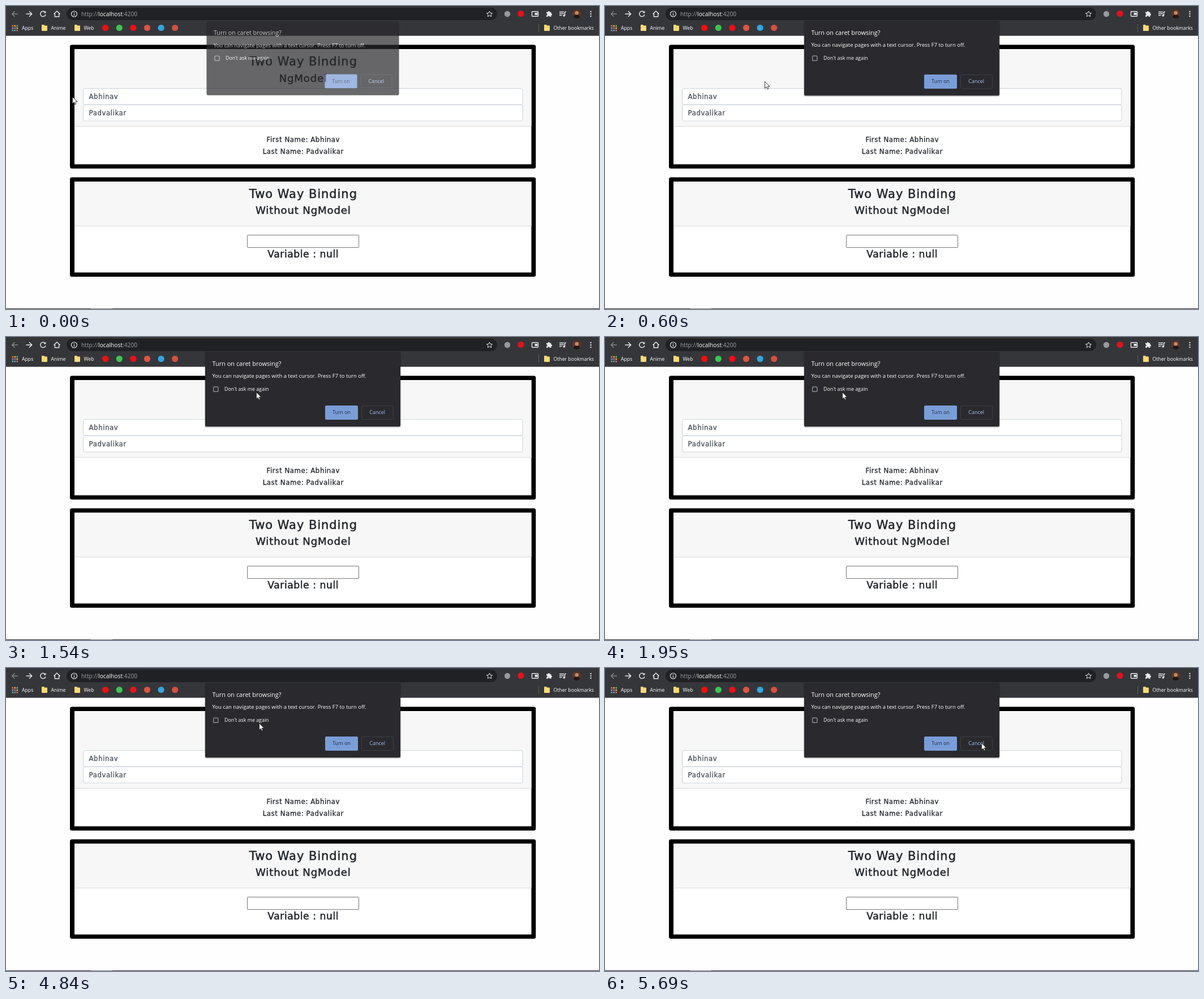
Recreate the animation shown at these times as an HTML page. Size 1048 by 535 pixels, loop 8000 ms.

```html
<!DOCTYPE html>
<html lang="en">
<head>
<meta charset="utf-8">
<title>Two Way Binding</title>
<style>
  html, body { margin: 0; width: 100%; height: 100%; overflow: hidden; background: #fefefe; }
  svg { display: block; }
  text { white-space: pre; }
  .ui { font: 8.7px "Open Sans", "Noto Sans", sans-serif; fill: #fff; }
  .url { font-size: 10.25px; fill: #9aa0a6; }
  .page { font-family: "DejaVu Sans", sans-serif; fill: #212529; stroke: #212529; stroke-width: .5px; }
  .mid { text-anchor: middle; }
  .h3 { font-size: 21px; letter-spacing: .95px; }
  .h4 { font-size: 18.2px; letter-spacing: .8px; }
  .h5 { font-size: 17.2px; letter-spacing: .55px; }
  .p { font-size: 11.8px; letter-spacing: .55px; stroke-width: .3px; }
  .value { fill: #495057; stroke: #495057; }
  .icon { fill: none; stroke: #e8eaed; stroke-width: 1.4; }
  #dialog { transform-origin: 524.7px 92px; }
</style>
</head>
<body>
<svg width="1048" height="535" viewBox="0 0 1048 535">
  <defs>
    <path id="folder" d="M0 1.2Q0 0 1.2 0H4L5.3 1.4H9Q10 1.4 10 2.4V10Q10 11 9 11H1Q0 11 0 10Z" fill="#fbd975"/>
    <filter id="shade" x="-5%" y="-10%" width="110%" height="125%">
      <feDropShadow dx="0" dy="1" stdDeviation=".8" flood-color="#000" flood-opacity=".5"/>
    </filter>
  </defs>

  <rect width="1048" height="535" fill="#fefefe"/>

  <!-- Browser bars -->
  <rect width="1048" height="52.6" fill="#35363a"/>
  <rect x="107" y="3" width="761" height="22" rx="11" fill="#202124"/>
  <g class="icon">
    <path d="M21 14H11M15.5 9.2L10.7 14L15.5 18.8" stroke="#85888c"/>
    <path d="M35.5 14H45.5M41 9.2L45.8 14L41 18.8"/>
    <path d="M69.2 11A4.7 4.7 0 1 0 70 15.2"/>
    <path d="M70.4 8.8V12.6H66.6Z" fill="#e8eaed" stroke="none"/>
    <path d="M84.5 14.3L90 9L95.5 14.3M86.3 13V18.8H93.7V13"/>
    <circle cx="120.5" cy="14" r="5" stroke-width="1.2"/>
    <path d="M120.5 13.2V17M120.5 11V12.2" stroke-width="1.3"/>
    <path d="M854.5 9L856 12.4L859.6 12.7L856.9 15.1L857.7 18.7L854.5 16.8L851.3 18.7L852.1 15.1L849.4 12.7L853 12.4Z" stroke-width="1"/>
    <rect x="929.5" y="9.7" width="11" height="8.6" rx="1"/>
    <path d="M978 10.5H986M978 13.5H986M978 16.5H982.5M987.6 17V10.4H990"/>
  </g>
  <g fill="#e8eaed">
    <rect x="934.5" y="12" width="5" height="3.8"/>
    <circle cx="986.2" cy="17" r="1.8"/>
    <path d="M955 10.8H957.6A1.7 1.7 0 0 1 961 10.8H963.4V13.2A1.7 1.7 0 0 1 963.4 16.6V19H960.9A1.7 1.7 0 0 0 957.5 19H955V16.5A1.7 1.7 0 0 0 955 13.1Z"/>
    <circle cx="1033.5" cy="10" r="1.2"/><circle cx="1033.5" cy="14" r="1.2"/><circle cx="1033.5" cy="18" r="1.2"/>
  </g>
  <circle cx="886" cy="14" r="5.2" fill="#96999d"/>
  <circle cx="910" cy="13.5" r="5.6" fill="#e0141e"/>
  <circle cx="1008.7" cy="14" r="8" fill="#5a3526"/>
  <path d="M1003 19.6Q1003.5 15.5 1008.7 15.5T1014.4 19.6Q1012 22 1008.7 22T1003 19.6Z" fill="#1d1715"/>
  <circle cx="1008.7" cy="12.2" r="3.3" fill="#c58a68"/>
  <text class="ui url" x="133" y="17.6">http://<tspan fill="#fff">localhost</tspan>:4200</text>

  <g id="apps"></g>
  <use href="#folder" x="63" y="33"/>
  <use href="#folder" x="121" y="33"/>
  <use href="#folder" x="951" y="33"/>
  <path d="M941.5 32V46" stroke="#5c5d61"/>
  <g class="ui">
    <text x="28" y="41.5">Apps</text>
    <text x="79.5" y="41.5">Anime</text>
    <text x="137.5" y="41.5">Web</text>
    <text x="967.5" y="41.5">Other bookmarks</text>
  </g>
  <g id="marks"></g>

  <!-- First card -->
  <rect x="113" y="68.5" width="823.3" height="218.5" rx="3.5"/>
  <rect x="121" y="76" width="807.5" height="203.5" fill="#fff"/>
  <rect x="121" y="76" width="807.5" height="136.5" fill="#f7f7f7"/>
  <path d="M121 212.5H928.5" stroke="#dadada"/>
  <g fill="#fff" stroke="#ced4da">
    <rect x="136.5" y="145.5" width="776.5" height="28.5" rx="3"/>
    <rect x="136.5" y="174.5" width="776.5" height="28.5" rx="3"/>
  </g>
  <g class="page">
    <text class="h3 mid" x="525.4" y="105">Two Way Binding</text>
    <text class="h4 mid" x="525.3" y="133.7">NgModel</text>
    <text class="p value" x="146.5" y="163.6">Abhinav</text>
    <text class="p value" x="146.5" y="192.6">Padvalikar</text>
    <text class="p mid" x="525.3" y="240">First Name: Abhinav</text>
    <text class="p mid" x="525.3" y="260.6">Last Name: Padvalikar</text>
  </g>

  <!-- Second card -->
  <rect x="113" y="302.5" width="823.3" height="175.5" rx="3.5"/>
  <rect x="121" y="310" width="807.5" height="160.5" fill="#fff"/>
  <rect x="121" y="310" width="807.5" height="78" fill="#f7f7f7"/>
  <path d="M121 388.5H928.5" stroke="#dadada"/>
  <rect x="426.5" y="404.5" width="197" height="22" rx="1.5" fill="#fff" stroke="#767676"/>
  <g class="page">
    <text class="h3 mid" x="525.4" y="339">Two Way Binding</text>
    <text class="h4 mid" x="525.3" y="367.4">Without NgModel</text>
    <text class="h5 mid" x="525.2" y="443.6">Variable : null</text>
  </g>

  <rect y="534" width="1048" height="1" fill="#2b2b2d"/>
  <rect x="150" y="534" width="38" height="1" fill="#77787a"/>

  <g id="dialog">
    <rect x="352" y="26" width="345" height="132" rx="2" fill="#292a2d" filter="url(#shade)"/>
    <rect x="366.7" y="88.2" width="8.2" height="8.2" rx="1" fill="none" stroke="#9aa0a6" stroke-width="1.2"/>
    <rect x="564" y="121" width="58" height="25" rx="2" fill="#7a9dd8"/>
    <rect x="628.5" y="121.5" width="56" height="24" rx="2" fill="none" stroke="#3c4043"/>
    <g class="ui">
      <text x="364.5" y="50.6" style="font-size:10.95px">Turn on caret browsing?</text>
      <text x="364.5" y="72.3" style="font-size:9.45px">You can navigate pages with a text cursor. Press F7 to turn off.</text>
      <text x="386" y="95.4" style="font-size:8.85px">Don't ask me again</text>
      <text class="mid" x="593" y="136.2" style="font-size:8.8px;fill:#202c42">Turn on</text>
      <text class="mid" x="656.2" y="136.2" style="font-size:9px;fill:#a3c1f5">Cancel</text>
    </g>
  </g>

  <path id="cursor" d="M.5 .5V12.4L3.2 9.9L5 14L7 13.1L5.2 9.1H9Z" fill="#fff" stroke="#111" stroke-width=".8"/>
</svg>
<script>
  const LOOP = 8000, OPENED = 70, STEP = 78;

  const linear = u => u;
  const smooth = u => u * u * (3 - 2 * u);
  const slow = u => 1 - (1 - u) ** 2;

  // The pointer moves in hops of STEP ms: first hop, hops, goal, easing
  const home = { x: 117, y: 160 };
  const moves = [
    { at: 290, hops: 9, x: 512, y: 95, ease: smooth },
    { at: 1010, hops: 1, x: 503, y: 96, ease: linear },
    { at: 1072, hops: 7, x: 442, y: 97, ease: linear },
    { at: 1620, hops: 5, x: 419, y: 97, ease: slow },
    { at: 4840, hops: 1, x: 447, y: 97, ease: linear },
    { at: 4920, hops: 7, x: 673, y: 132, ease: smooth },
    { at: 5466, hops: 3, x: 665, y: 132, ease: linear }
  ];

  function pointer(t) {
    let { x, y } = home;
    for (const m of moves) {
      if (t < m.at) break;
      const hop = Math.floor((t - m.at) / STEP) + 1;
      const u = m.ease(Math.min(1, hop / m.hops));
      x += (m.x - x) * u;
      y += (m.y - y) * u;
    }
    return { x, y };
  }

  const $ = id => document.getElementById(id);

  function add(parent, tag, attrs) {
    const el = document.createElementNS("http://www.w3.org/2000/svg", tag);
    for (const key in attrs) el.setAttribute(key, attrs[key]);
    parent.append(el);
  }

  const tints = ["#e8705f", "#efb84a", "#66b57a", "#6b9eea"];
  for (let i = 0; i < 9; i++) {
    add($("apps"), "rect", {
      x: 10.5 + i % 3 * 4, y: 33.8 + Math.floor(i / 3) * 4,
      width: 2.6, height: 2.6, fill: tints[i % 4]
    });
  }

  ["#f00f0f", "#3fc351", "#f00f1a", "#dc5541", "#35a5de", "#d2513f"]
    .forEach((fill, i) => add($("marks"), "circle", { cx: 175.7 + i * 24.6, cy: 38.5, r: 5.6, fill }));

  function draw(t) {
    const { x, y } = pointer(t);
    $("cursor").setAttribute("transform", `translate(${Math.round(x)} ${Math.round(y)})`);
    const opening = t < OPENED;
    $("dialog").style.opacity = opening ? .7 : 1;
    $("dialog").style.transform = opening ? "scale(.985)" : "none";
  }

  const start = performance.now();
  function tick() {
    draw((performance.now() - start) % LOOP);
    requestAnimationFrame(tick);
  }
  tick();
</script>
</body>
</html>
```
